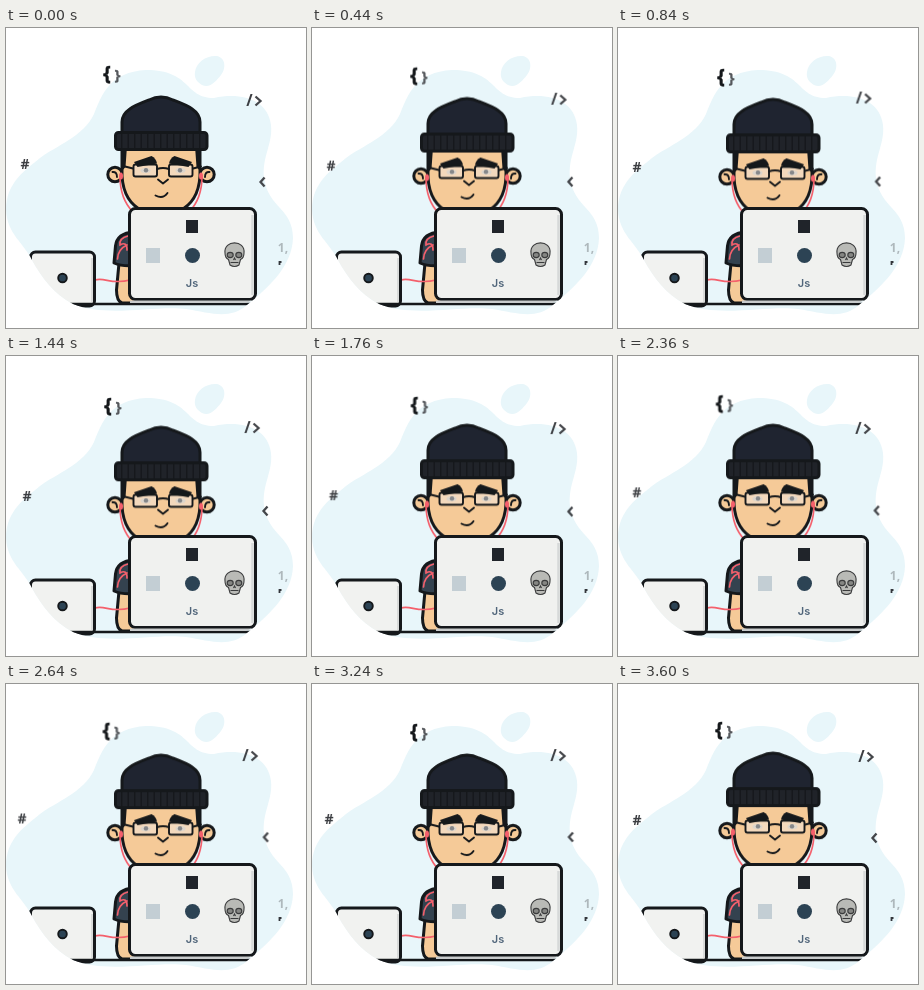
Write an HTML page that moves like this. It is 300 px wide and 300 px high and loops after 3640 ms.

```html
<!DOCTYPE html>
<html lang="en">
<head>
<meta charset="utf-8">
<title>Coder with headphones</title>
<style>
  html, body { margin: 0; width: 100%; height: 100%; overflow: hidden; background: #fff; }
  svg { display: block; width: 300px; height: 300px; }
  text { font-family: "Noto Sans", "Open Sans", sans-serif; font-weight: 700; text-anchor: middle; fill: #3c3e42; }
  .line { stroke: #15181b; stroke-width: 3; stroke-linejoin: round; stroke-linecap: round; }
  .thin { stroke-width: 1.9; }
  .none { fill: none; }
  .skin { fill: #f5ca98; }
  .cord { fill: none; stroke: #f4606c; stroke-width: 1.7; stroke-linecap: round; }
  .chevron { fill: none; stroke: #44464a; stroke-width: 2.3; }

  .head { animation: bob 606.667ms ease-in-out infinite; }
  @keyframes bob {
    50% { transform: translateY(2.6px); }
  }

  /* each symbol wanders through its own five offsets */
  .drift { animation: drift 3640ms linear infinite; }
  @keyframes drift {
    0%, 98.9%, 100% { transform: translate(0, 0); }
    23.08% { transform: translate(var(--a)); }
    39.56% { transform: translate(var(--b)); }
    56.04% { transform: translate(var(--c)); }
    72.53% { transform: translate(var(--d)); }
    89.01% { transform: translate(var(--e)); }
  }
</style>
</head>
<body>
<svg viewBox="0 0 300 300">
  <defs>
    <path id="blob" d="M0 182 C0 154 20 142 34 130 C50 118 78 108 88 86 C96 66 104 44 140 42 C186 42 178 70 208 70 C236 64 262 72 265 97 C267 116 256 128 258 150 C262 180 287 180 287 210 C286 238 264 258 241 277 C224 292 205 285 180 281 C150 277 100 290 67 276 C48 266 36 250 26 232 C18 215 1 206 0 182Z"/>
    <clipPath id="stage"><use href="#blob"/></clipPath>
    <g id="side">
      <circle class="line skin" cx="109" cy="146.500" r="7.200"/>
      <path class="line none thin" d="M106.500 144 Q111 143.500 111 149"/>
    </g>
    <g id="eye">
      <rect x="127.500" y="136.500" width="23.500" height="12" rx="2" fill="#f3d9bd"/>
      <ellipse cx="139.500" cy="142.500" rx="5" ry="2.500" fill="#dcd5cc"/>
      <circle cx="140" cy="142.300" r="2.200" fill="#85878a"/>
      <path fill="#15181b" d="M128 134 L145.500 128 Q150 130 151 135.500 L131.500 139Z"/>
      <rect class="line none thin" x="127.500" y="136.500" width="23.500" height="12" rx="2"/>
      <path class="line none thin" d="M119 138.500 L127 140.500"/>
    </g>
  </defs>

  <g fill="#e8f6fa">
    <use href="#blob"/>
    <path d="M189 44 C190 34 201 27 211 28 C220 30 220 41 215 47 C210 53 204 61 196 57 C191 54 188 50 189 44Z"/>
  </g>

  <!-- arm and sleeve -->
  <path class="line skin" d="M113 235 L110.500 262 Q110.500 273 116 275 H130 V235Z"/>
  <path class="line" fill="#34424f" d="M128 204 Q111 205 109.500 218 L108 235 Q116 238.500 128 237.500Z"/>
  <path class="cord" d="M122 208 Q113 210 114 217 Q121 213 121 222 M111.500 231 Q112 221 121 217"/>
  <path class="cord" d="M89 252 C99 249 105 257 124 252"/>

  <g class="head">
    <use href="#side"/>
    <use href="#side" transform="matrix(-1 0 0 1 310 0)"/>
    <path class="cord" d="M114 148 C114 164 118 175 127 184 M196 148 C196 164 192 175 183 184"/>
    <path class="line skin" d="M116 112 V148 C117 164 124 177 137 183 Q155 191 173 183 C186 177 193 164 194 148 V112Z"/>
    <path fill="#15181b" d="M115 118 H121 L119.500 139 L115 144Z M195 118 H189 L190.500 139 L195 144Z"/>
    <use href="#eye"/>
    <use href="#eye" transform="matrix(-1 0 0 1 314 0)"/>
    <path class="line none thin" d="M151 141 Q157 139 163 141"/>
    <path class="line none thin" d="M152 151.500 L157 155.500 L162 151.500 M149.500 167.500 Q157 171.500 161.500 165"/>
    <g fill="#f4606c">
      <ellipse cx="115" cy="148" rx="2" ry="3.500"/>
      <ellipse cx="195" cy="148" rx="2" ry="3.500"/>
    </g>
    <path class="line" fill="#1f2430" d="M116 107 V94 C116 82 130 77 143 72 Q155 66 167 72 C180 77 194 82 194 94 V107Z"/>
    <rect class="line" fill="#202329" x="109.500" y="104.500" width="91.500" height="17" rx="3"/>
    <path class="none" stroke="#16181c" stroke-width="14" stroke-dasharray="1.400 5.100" d="M115 113 H197"/>
  </g>

  <g clip-path="url(#stage)">
    <!-- small laptop -->
    <rect class="line" fill="#f1f2f0" x="24.500" y="224" width="64" height="54" rx="5"/>
    <path class="none" stroke="#d9dbda" stroke-width="2" d="M86 230 V274"/>
    <circle class="line thin" fill="#2c4354" cx="56.500" cy="250" r="4.300"/>
    <!-- table edge -->
    <path class="line none" d="M20 276 H280" style="stroke-width:2.500"/>
  </g>

  <!-- large laptop -->
  <rect class="line" fill="#f0f1ef" x="123.500" y="180.500" width="126" height="91" rx="6"/>
  <path class="none" stroke="#d6d8d8" stroke-width="2.500" d="M246.500 187 V267"/>
  <path fill="#c8cbcc" d="M124 272.500 H246 L240 275 H124Z"/>

  <!-- stickers -->
  <rect x="180" y="192" width="12" height="13" fill="#20242a"/>
  <rect x="140" y="220" width="14" height="15" fill="#c3ced4"/>
  <circle cx="186.500" cy="227.500" r="7.500" fill="#2c4354"/>
  <g stroke="#3a3b3c" stroke-width="1.100">
    <path fill="#b9bab6" d="M219 225 C217.500 211.500 239.500 211.500 238 225 Q238 230 234.500 231.500 L233 237 Q228.500 240 224 237 L222.500 231.500 Q219 230 219 225Z"/>
    <ellipse cx="224.200" cy="227" rx="3" ry="2.600" fill="#858683"/>
    <ellipse cx="232.800" cy="227" rx="3" ry="2.600" fill="#858683"/>
    <path class="none" d="M227.500 232 L228.500 230 L229.500 232 M224.500 234.500 H232.500"/>
  </g>
  <text x="186" y="259" font-size="11" style="font-family:Inter,Roboto,sans-serif;font-weight:600;fill:#50657a">Js</text>

  <!-- floating code -->
  <g class="drift" style="--a:2px,3px;--b:1px,4px;--c:2px,2px;--d:-.6px,.8px;--e:1px,2px">
    <text x="101" y="52" font-size="19" stroke="#15181b" stroke-width=".5" style="fill:#15181b">{</text>
    <text x="111.500" y="51.500" font-size="15" stroke="#55585c" stroke-width=".3" style="fill:#55585c">}</text>
  </g>
  <g class="drift" style="--a:-2.500px,-2.500px;--b:-2px,-1px;--c:-2px,1px;--d:-4px,-1px;--e:-2px,-1px">
    <text x="243.500" y="78.500" font-size="15.500">/</text>
    <path class="chevron" d="M249.500 68.500 L254.500 73 L249.500 77.500"/>
  </g>
  <g class="drift" style="--a:0px,3px;--b:2px,4px;--c:3px,2.500px;--d:-3px,-1.500px;--e:-2px,-1px">
    <text x="19" y="141" font-size="14">#</text>
  </g>
  <g class="drift" style="--a:3.600px,-.5px;--b:3px,1px;--c:1px,2px;--d:3.500px,-.8px;--e:2.500px,-1px">
    <path class="chevron" d="M258.500 149.500 L254.500 154 L258.500 158.500"/>
  </g>
  <text x="277" y="224" font-size="12" style="fill:#aeb8bc">1,</text>
  <path class="none" stroke="#33363b" stroke-width="1.800" d="M275.500 234 H273.500 V237"/>
</svg>
</body>
</html>
```
